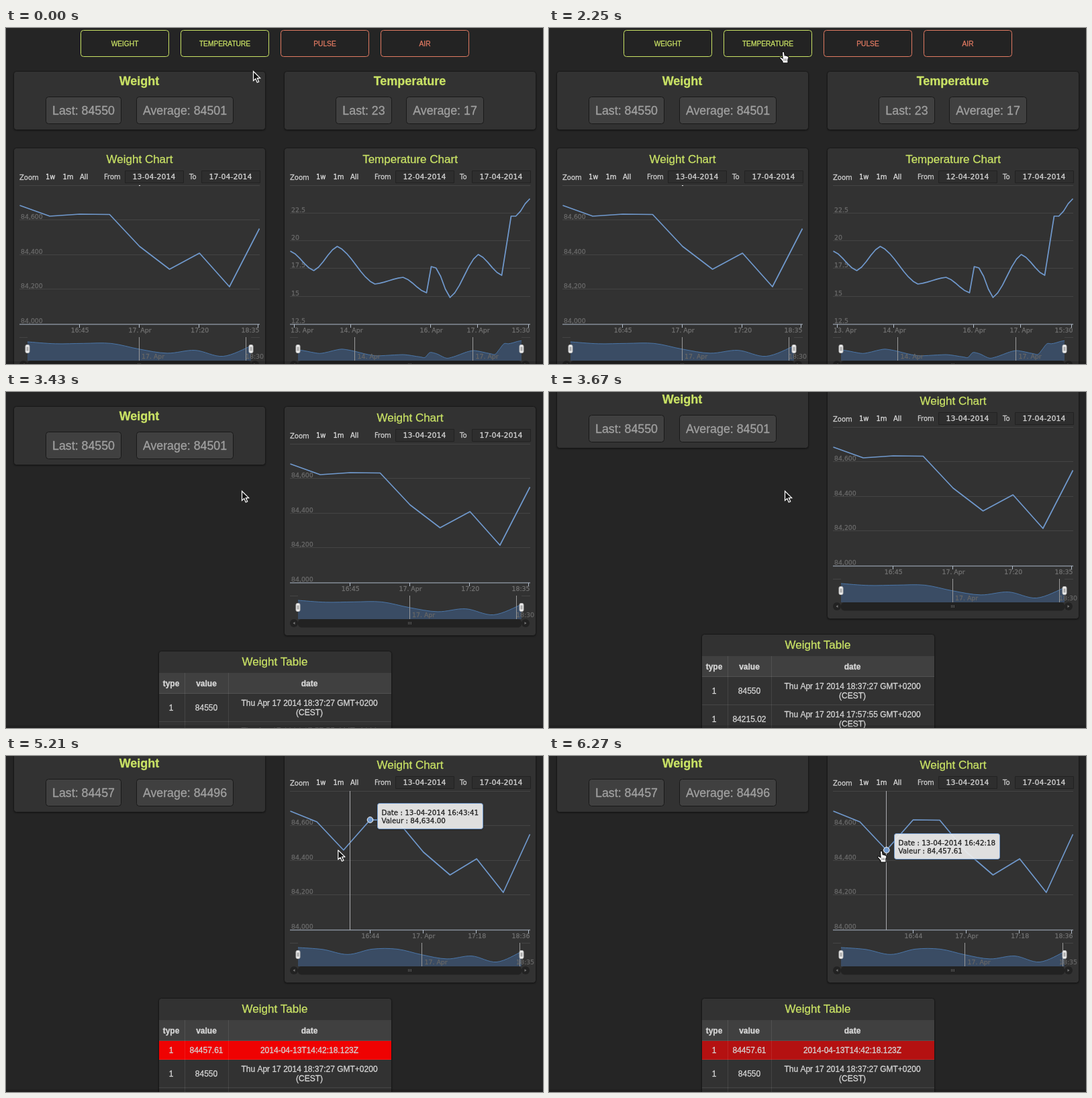
These frames come from a looping animation (800 by 500 pixels, 6.39 s). An HTML page with a canvas:

```html
<!DOCTYPE html>
<html lang="en">
<head>
<meta charset="utf-8">
<title>Sensor dashboard</title>
<style>
html, body { margin: 0; width: 100%; height: 100%; overflow: hidden; background: #252525; }
canvas { display: block; width: 800px; height: 500px; }
</style>
</head>
<body>
<canvas id="stage" width="800" height="500"></canvas>
<script>
const ctx = document.getElementById('stage').getContext('2d');
const LOOP = 6390, STEPS = 54, STEP = LOOP / STEPS;
const LIME = '#c9e265', CORAL = '#e07a62', BLUE = '#7099cd';
const SANS = '"Liberation Sans", Arial, sans-serif';
const UI = '"DejaVu Sans", Verdana, sans-serif';
const LEFT = 423.5, WIDTH = 357, SCROLL = 68;

// Steps at which the page changes state
const TOGGLE = 21, SCROLL_START = 27, SCROLL_END = 31, DATA = 40, DATA_END = 44, LAST_HOVER = 48;

const clamp = v => Math.max(0, Math.min(1, v));
const swing = v => 0.5 - Math.cos(Math.PI * clamp(v)) / 2;
const mix = (a, b, k) => a + (b - a) * k;
const mixPoint = (a, b, k) => [mix(a[0], b[0], k), mix(a[1], b[1], k)];
const crisp = x => Math.round(x) - .5;

// Keys are [position, ...values]
function sample(keys, at, ease = swing) {
  const next = keys.findIndex(k => k[0] > at);
  if (next < 0) return keys[keys.length - 1].slice(1);
  const a = keys[next - 1], b = keys[next], k = ease((at - a[0]) / (b[0] - a[0]));
  return a.slice(1).map((v, i) => mix(v, b[i + 1], k));
}

const POINTER = [
  [0, 368, 64], [6, 352, 66], [10, 350, 55], [14, 348, 54], [17, 346, 26], [20, 350, 38], [22, 350, 38],
  [25, 351, 147], [33, 351, 147], [35, 430, 230], [37, 484, 141], [39, 494, 139], [53, 495, 141]
];

const spread = ys => ys.map((y, i) => [LEFT + i * WIDTH / (ys.length - 1), y]);
const readings = [150, 166, 163, 163.5, 211, 245, 221, 271, 184.5];
const OLD = spread(readings);
const NEW = spread([...readings.slice(0, 2), 208, ...readings.slice(2)]);

const tempKeys = [
  [0, 218], [5, 247], [10, 211], [18, 267], [24, 257], [29, 280], [30, 241],
  [31, 243], [34, 287], [40, 223], [45, 254], [47, 166], [48, 166], [51, 140]
];
const softEase = v => mix(v, swing(v), .6);
const TEMP = spread(Array.from({ length: 52 }, (_, i) => sample(tempKeys, i, softEase)[0]));

// [first step, point, crosshair point, time, value]
const HOVER = [
  [35, OLD[0], OLD[0], '16:36:10', '84,685.00'],
  [36, OLD[1], OLD[1], '16:39:52', '84,622.00'],
  [38, OLD[2], OLD[2], '16:43:41', '84,634.00'],
  [DATA, NEW[3], OLD[2], '16:43:41', '84,634.00'],
  [LAST_HOVER, NEW[2], NEW[2], '16:42:18', '84,457.61']
];

const gridLines = (rows, top, step, format) => Array.from({ length: rows + 1 }, (_, i) => ({
  y: mix(120.5, 327, i / rows), label: i ? format(top - step * (i - 1)) : ''
}));
const WEIGHT_GRID = gridLines(4, 84600, 200, v => v.toLocaleString('en-US'));
const TEMP_GRID = gridLines(5, 22.5, 2.5, String);

function weightChart(points, fresh) {
  const base = fresh ? NEW : OLD, shift = fresh ? 1 : 0;
  const labels = fresh ? ['16:44', '17. Apr', '17:18'] : ['16:45', '17. Apr', '17:20'];
  return {
    title: 'Weight Chart', from: '13-04-2014', points, grid: WEIGHT_GRID,
    ticks: [...labels.map((s, i) => [base[2 * i + 2 + shift][0], s]), [779, fresh ? '18:36' : '18:35']],
    marks: [[toNav(base[4 + shift])[0], '17. Apr'], fresh ? [766, '18:35'] : [761, '18:30']]
  };
}
const TEMP_CHART = {
  title: 'Temperature Chart', from: '12-04-2014', points: TEMP, grid: TEMP_GRID,
  ticks: [[430, '13. Apr'], [514, '14. Apr'], [633, '16. Apr'], [703, '17. Apr'], [779, '15:30']],
  marks: [[520, '14. Apr'], [696, '17. Apr']]
};

function toNav([x, y]) {
  return [mix(435, 768, (x - LEFT) / WIDTH), 353 + (y - 150) * .178];
}

function text(str, x, y, size, color, align = 'center', family = SANS, weight = '') {
  ctx.font = `${weight} ${size}px ${family}`;
  ctx.fillStyle = ctx.strokeStyle = color;
  ctx.textAlign = align;
  ctx.lineJoin = 'round';
  ctx.lineWidth = .3;
  ctx.fillText(str, x, y);
  ctx.strokeText(str, x, y);
}
const uiText = (str, x, y, size, color, align = 'left') => text(str, x, y, size, color, align, UI);

function box(x, y, w, h, r, fill, stroke) {
  ctx.beginPath();
  ctx.roundRect(x, y, w, h, r);
  if (fill) { ctx.fillStyle = fill; ctx.fill(); }
  if (stroke) { ctx.strokeStyle = stroke; ctx.lineWidth = 1; ctx.stroke(); }
}

function strokePath(color, width = 1) {
  ctx.strokeStyle = color;
  ctx.lineWidth = width;
  ctx.stroke();
}

function line(x1, y1, x2, y2, color, width) {
  ctx.beginPath();
  ctx.moveTo(x1, y1);
  ctx.lineTo(x2, y2);
  strokePath(color, width);
}

function shadowBox(x, y, w, h, r, fill, stroke) {
  ctx.save();
  ctx.shadowColor = 'rgba(0,0,0,.55)';
  ctx.shadowBlur = 2;
  ctx.shadowOffsetY = 1;
  box(x, y, w, h, r, fill);
  ctx.restore();
  box(x, y, w, h, r, null, stroke);
}
const panel = (x, y, w, h) => shadowBox(x + .5, y + .5, w - 1, h - 1, 4, '#323232', '#181818');

function button(label, column, on) {
  const x = 111 + column * 149, color = on ? LIME : CORAL;
  box(x + .5, 3.5, 131, 39, 4, '#232323', color);
  text(label, x + 66, 27, 10.2, color);
}

function stat(label, x, w) {
  box(x + .5, 102.5, w - 1, 40, 4, '#404040', '#191919');
  text(label, x + w / 2, 129, 17.8, '#a0a0a0');
}

function summary(title, x, stats) {
  panel(x, 64, 376, 88);
  text(title, x + 187.5, 85, 18, LIME, 'center', SANS, 'bold');
  stats.forEach(s => stat(...s));
}

function spline(points) {
  points.forEach((p, i) => {
    if (!i) return ctx.lineTo(...p);
    const a = points[i - 1], before = points[i - 2] || a, after = points[i + 1] || p;
    ctx.bezierCurveTo(
      a[0] + (p[0] - before[0]) / 6, a[1] + (p[1] - before[1]) / 6,
      p[0] - (after[0] - a[0]) / 6, p[1] - (after[1] - a[1]) / 6, ...p);
  });
}

function drawNavigator({ points, marks }) {
  const curve = points.map(toNav);
  line(423, 346.5, 435, 346.5, '#444');
  line(768, 346.5, 781, 346.5, '#444');
  ctx.beginPath();
  ctx.moveTo(435, 381);
  spline(curve);
  ctx.lineTo(768, 381);
  ctx.fillStyle = '#3a4c64';
  ctx.fill();
  ctx.beginPath();
  spline(curve);
  strokePath('#4b76a8');
  marks.forEach(([x, label]) => {
    line(crisp(x), 346, crisp(x), 381, '#999');
    uiText(label, Math.min(x + 3.5, 760), 377.5, 9.4, '#666');
  });
  box(435, 381, 333, 12.5, 5, '#222');
  [[429, -1.5], [774, 1.5]].forEach(([x, d]) => {
    box(x - 6, 381, 12, 12, 6, '#222');
    ctx.beginPath();
    ctx.moveTo(x + d, 387);
    ctx.lineTo(x - d, 385);
    ctx.lineTo(x - d, 389);
    ctx.fillStyle = '#777';
    ctx.fill();
  });
  [-2, 0, 2].forEach(d => line(601.5 + d, 385, 601.5 + d, 389, '#555'));
  [435, 768].forEach(x => {
    box(x - 3, 357.5, 6, 12, 2, '#eee', '#b5b5b5');
    [-.8, .8].forEach(d => line(x + d, 360.5, x + d, 366.5, '#666', .7));
  });
}

function drawChart(chart, dx, dy) {
  ctx.save();
  ctx.translate(dx, dy);
  panel(414, 64, 376, 342);
  text(chart.title, 602, 86.5, 17, LIME);
  uiText('Zoom', 423, 111.5, 10, '#ccc');
  ['1w', '1m', 'All'].forEach((s, i) => uiText(s, 462 + i * 25.5, 111, 10, '#ddd'));
  uiText('From', 549, 111, 10, '#ccc');
  uiText('To', 676, 111, 10, '#ccc');
  [chart.from, '17-04-2014'].forEach((date, i) => {
    const x = 580.5 + i * 114;
    box(x, 98.5, 87, 18, 0, '#2e2e2e', '#222');
    uiText(date, x + 43, 111, 11, '#d4d4d4', 'center');
  });
  chart.grid.forEach(({ y, label }) => {
    line(423, crisp(y), 781, crisp(y), '#444');
    uiText(label, 425, y - 2, 9.4, '#696969');
  });
  line(423, 327, 781, 327, '#a3afbf', 1.2);
  chart.ticks.forEach(([x, label]) => {
    line(crisp(x), 327, crisp(x), 332, '#b5bfcc');
    uiText(label, Math.max(441, Math.min(x + .5, 767)), 338.5, 9.4, '#707070', 'center');
  });
  ctx.beginPath();
  chart.points.forEach(p => ctx.lineTo(...p));
  strokePath(BLUE, 1.7);
  drawNavigator(chart);
  ctx.restore();
}

function tableRow(y, h, fill, cells, weight) {
  const border = 'rgba(255,255,255,.09)';
  ctx.fillStyle = fill;
  ctx.fillRect(228, y, 346, h);
  [246, 298.5, 452].forEach((center, i) => {
    const lines = cells[i].split('\n');
    lines.forEach((s, j) => text(s, center, y + h / 2 + 4 + (j - (lines.length - 1) / 2) * 14,
      12, '#d6d6d6', 'center', SANS, weight));
  });
  [266.5, 331.5].forEach(x => line(x, y, x, y + h, border));
  line(228, y + h - .5, 574, y + h - .5, border);
}

function drawTable(fresh, time) {
  panel(227, 428, 348, 260);
  text('Weight Table', 400.5, 450, 17, LIME);
  tableRow(461, 31, '#404040', ['type', 'value', 'date'], 'bold');
  let y = 492;
  if (fresh) {
    const k = swing((time - DATA * STEP) / 3900);
    const low = mix(0, 50, k);
    tableRow(y, 28, `rgb(${mix(246, 50, k)},${low},${low})`, ['1', '84457.61', '2014-04-13T14:42:18.123Z']);
    y += 28;
  }
  [['84550', '18:37:27'], ['84215.02', '17:57:55']].forEach(([value, clock], i) =>
    tableRow(y + i * 42, 42, '#323232', ['1', value, `Thu Apr 17 2014 ${clock} GMT+0200\n(CEST)`]));
}

const tipPlace = ([x, y]) => [x + 11, y - SCROLL - 24];

function drawHover(n) {
  const shown = HOVER.filter(h => h[0] <= n);
  if (!shown.length) return;
  const [start, point, cross, clock, value] = shown[shown.length - 1];
  const previous = (shown[shown.length - 2] || shown[0])[1];
  line(crisp(cross[0]), 52, crisp(cross[0]), 259, '#aaaaae');
  ctx.beginPath();
  ctx.arc(point[0], point[1] - SCROLL, 4.3, 0, 7);
  ctx.fillStyle = BLUE;
  ctx.fill();
  strokePath('#fff');

  // The tooltip closes in on its point exponentially
  const [tx, ty] = mixPoint(tipPlace(previous), tipPlace(point), 1 - .26 ** (n - start + 1));
  const x = Math.round(tx), y = Math.round(ty);
  shadowBox(x + .5, y - .5, 157, 38, 3, 'rgba(255,255,255,.86)', BLUE);
  uiText(`Date : 13-04-2014 ${clock}`, x + 6.5, y + 16.5, 10.35, '#222');
  uiText(`Valeur : ${value}`, x + 6.5, y + 28.5, 10.35, '#222');
}

const ARROW = new Path2D('M.5 .5V14.5L3.8 11.5L6.2 17L8.7 16L6.3 10.6H10.7Z');
const HAND = new Path2D('M-1.5 1Q0-.8 1.4 1L2.2 6Q3.5 5 4.4 6.4Q5.8 5.6 6.5 7.2Q8 7 8 9L7 14V17H-1V15L-5.5 9.6Q-5.5 7.6-3.4 8.4L-.9 10Z');

function drawPointer(n) {
  const hand = (n >= 16 && n <= 22) || n >= LAST_HOVER;
  const shape = hand ? HAND : ARROW;
  ctx.save();
  ctx.translate(...sample(POINTER, n));
  ctx.lineWidth = 1.2;
  ctx.fillStyle = hand ? '#fff' : '#111';
  ctx.strokeStyle = hand ? '#111' : '#fff';
  ctx.fill(shape);
  ctx.stroke(shape);
  if (hand) [1.2, 3.6, 6].forEach(x => line(x, 10.5, x, 14, '#333', .8));
  ctx.restore();
}

function draw(time) {
  const n = Math.floor((time + 6) / STEP) % STEPS;
  const both = n < TOGGLE, fresh = n >= DATA;
  const scrolled = clamp((n - SCROLL_START) / (SCROLL_END - SCROLL_START));
  const scroll = Math.round(SCROLL * (1 - (1 - scrolled) ** 1.44));
  const grown = swing((n - DATA + .5) / (DATA_END - DATA));
  const points = fresh ? NEW.map((p, i) => mixPoint(OLD[i] || p, p, grown)) : OLD;

  ctx.fillStyle = '#252525';
  ctx.fillRect(0, 0, 800, 500);
  ctx.save();
  ctx.translate(0, -scroll);
  ['WEIGHT', 'TEMPERATURE', 'PULSE', 'AIR'].forEach((label, i) => button(label, i, i < (both ? 2 : 1)));
  summary('Weight', 11, [
    [fresh ? 'Last: 84457' : 'Last: 84550', 59, 113],
    [fresh ? 'Average: 84496' : 'Average: 84501', 194, 145]
  ]);
  if (both) {
    summary('Temperature', 414, [['Last: 23', 491, 84], ['Average: 17', 596, 116]]);
    drawChart(weightChart(points, false), -403, 114);
    drawChart(TEMP_CHART, 0, 114);
    ctx.fillStyle = '#fff';
    ctx.fillRect(198, 234, 2, 1);
  } else {
    drawChart(weightChart(points, fresh), 0, 0);
    drawTable(fresh, time);
  }
  ctx.restore();
  drawHover(n);
  ctx.fillStyle = 'rgba(0,0,0,.15)';
  ctx.fillRect(0, 496, 800, 4);
  drawPointer(n);
}

const start = performance.now();
function tick() {
  draw((performance.now() - start) % LOOP);
  requestAnimationFrame(tick);
}
tick();
</script>
</body>
</html>
```
